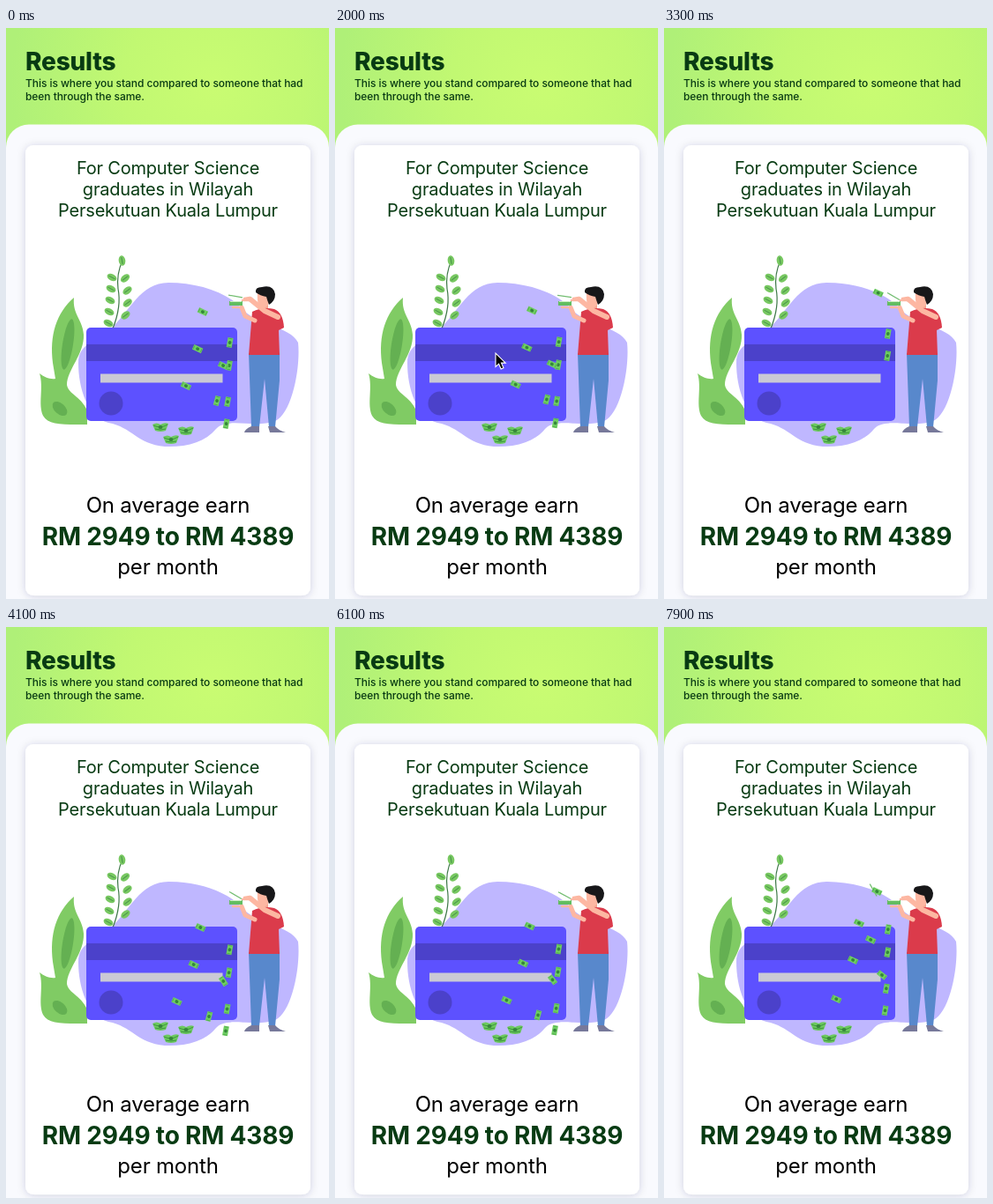
Write an HTML page that moves like this. It is 366 px wide and 648 px high and loops after 8000 ms.

```html
<!DOCTYPE html>
<html lang="en">
<head>
<meta charset="utf-8">
<title>Results</title>
<style>
  html, body { margin: 0; width: 100%; height: 100%; overflow: hidden; }
  svg { display: block; width: 366px; height: 648px; font-family: Inter, sans-serif; letter-spacing: -.2px; }
  .mid { text-anchor: middle; }
  .note { font-size: 12px; font-weight: 500; letter-spacing: -.06px; }
  .skin { stroke: #fdb7a2; stroke-linecap: round; stroke-linejoin: round; fill: none; }
</style>
</head>
<body>
<svg viewBox="0 0 366 648">
  <defs>
    <radialGradient id="sky" gradientUnits="userSpaceOnUse" cx="235" cy="65" r="230">
      <stop offset="0" stop-color="#c9fc72"/>
      <stop offset=".45" stop-color="#c1f872"/>
      <stop offset="1" stop-color="#aff078"/>
    </radialGradient>
    <filter id="shade" x="-10%" y="-10%" width="120%" height="120%">
      <feDropShadow dx="0" dy="1" stdDeviation="5" flood-color="#30304a" flood-opacity=".17"/>
    </filter>
    <g id="bill">
      <rect x="-5.5" y="-3" width="11" height="6" fill="#6fce63"/>
      <ellipse rx="2" ry="1.8" fill="#35863a"/>
      <path d="M-4.5-2v4M4.5-2v4" stroke="#4ea84a" stroke-width=".8"/>
    </g>
    <g id="heap">
      <path d="M-9-3Q-4-6 0-3Q5-6 9-4L6 4Q0 6-6 4Z" fill="#6cc95f"/>
      <path d="M-8-2Q0 2 8-3M-6 2Q0 4 6 2" stroke="#3f963f" fill="none"/>
      <ellipse rx="2.5" ry="2" fill="#35863a"/>
    </g>
  </defs>

  <rect width="366" height="648" fill="url(#sky)"/>
  <rect y="109.500" width="366" height="600" rx="26" fill="#f9fafe"/>
  <rect x="22" y="133" width="323" height="511" rx="9" fill="#fff" filter="url(#shade)"/>

  <g fill="#083b13">
    <text x="22" y="48" font-size="28" font-weight="800">Results</text>
    <text class="note" x="22" y="67">This is where you stand compared to someone that had</text>
    <text class="note" x="22" y="82">been through the same.</text>
    <g class="mid" font-size="20">
      <text x="183.5" y="166">For Computer Science</text>
      <text x="183.5" y="190">graduates in Wilayah</text>
      <text x="183.5" y="214">Persekutuan Kuala Lumpur</text>
    </g>
    <text class="mid" x="183.5" y="587" font-size="28" font-weight="700">RM 2949 to RM 4389</text>
  </g>
  <g class="mid" font-size="24">
    <text x="183.5" y="550">On average earn</text>
    <text x="183.5" y="620">per month</text>
  </g>

  <!-- backdrop and plants -->
  <path d="M118 342C140 322 152 289 184 289C216 289 248 299 265 316C282 338 322 338 331 357C334 385 324 438 305 446C283 455 250 441 238 455C226 470 204 476 180 475C148 472 143 453 116 448C92 442 82 408 82 380C82 358 102 356 118 342Z" fill="#bfb7ff"/>
  <g fill="#80cb64">
    <path d="M77 306C57 323 49 349 53 380L56 398C50 399 43 396 38 392C43 408 36 427 42 440C48 451 65 450 92 450V434C84 417 71 416 69 405C69 388 89 370 88 348C87 331 75 325 77 306Z"/>
    <g fill="#64b052">
      <ellipse cx="70" cy="359" rx="6" ry="29" transform="rotate(9 70 359)"/>
      <ellipse cx="61" cy="432" rx="6" ry="10" transform="rotate(-48 61 432)"/>
    </g>
  </g>
  <path d="M121 341Q131 316 127 296Q125 279 132 264" fill="none" stroke="#3c7746" stroke-width="1.200"/>
  <g id="sprig" fill="#78c861"></g>

  <!-- bank card -->
  <rect x="91" y="340" width="171" height="106" rx="5" fill="#5d51ff"/>
  <path d="M91 359H262V378H91Z" fill="#4b41ca"/>
  <path d="M107 392.500H245.500V402.500H107Z" fill="#cac9d5"/>
  <circle cx="119" cy="426" r="13.500" fill="#4b41ca"/>

  <use href="#heap" x="175" y="453"/>
  <use href="#heap" x="204" y="457"/>
  <use href="#heap" x="187" y="467"/>

  <!-- standing figure -->
  <path d="M275 369H310V400L305 453H298L293 398L287 453H278Z" fill="#5888cc"/>
  <path d="M278 452H287V459H270Q271 455 278 452ZM297 452H305Q309 457 317 459H299Z" fill="#77799a"/>
  <path d="M287 314L297 313V325H286Z" fill="#f6a58f"/>
  <path d="M285 299Q284 315 289 318Q298 319 299 306L296 298Z" fill="#fdb7a2"/>
  <path d="M283 300Q282 294 290 294Q303 291 305 302Q305 310 298 314Q296 309 295 305Q288 304 283 300Z" fill="#171719"/>
  <path d="M279 322Q291 316 304 319Q314 323 315 340L309 343L310 371H275Z" fill="#db3b4b"/>
  <path class="skin" d="M282 332L271 327L267 317" stroke-width="5"/>
  <path class="skin" d="M308 328L293 321L277 308" stroke-width="6"/>
  <path class="skin" d="M278 309H268M276 306L270 307M267 317H257" stroke-width="2.500"/>
  <path d="M253 310H268V315H253Z" fill="#62bd61"/>
  <path d="M254 310.500H267" stroke="#c9efc0"/>

  <path id="flick" d="M-8 0H8" stroke="#72bd70" stroke-width="1.200"/>
  <g id="bills"></g>
  <path id="cursor" d="M0 0V15.500L3.600 12.200L6.100 18L9 16.700L6.500 11.100H11.200Z" stroke="#fff" stroke-width="1.100"/>
</svg>

<script>
const LOOP = 8000, STEP = 100, CYCLE = 2007, START = 1000;
const $ = id => document.getElementById(id);
const clamp = v => Math.max(0, Math.min(1, v));
const place = (el, x, y, a = 0) =>
  el.setAttribute('transform', `translate(${x} ${y}) rotate(${a})`);
const show = (el, on) => el.style.display = on ? '' : 'none';

function add(parent, tag, attrs) {
  const el = document.createElementNS('http://www.w3.org/2000/svg', tag);
  for (const k in attrs) el.setAttribute(k, attrs[k]);
  return parent.appendChild(el);
}

function leaf(x, y, a) {
  const g = add($('sprig'), 'g', {});
  add(g, 'ellipse', { rx: 5.8, ry: 3.8 });
  add(g, 'path', { d: 'M-4 0H4', stroke: '#479449' });
  place(g, x, y, a);
}
leaf(131.5, 264, 80);
for (let i = 0; i < 5; i++) {
  leaf(120 - i, 283 + i * 13, 28);
  if (i < 4) leaf(135 + Math.sin(i) * 3, 284 + i * 14, -38);
}

// A tossed note arcs out of the hand, then falls along one of two curves.
const FALL = .22, TOSS = 60;
function toss(curve) {
  return age => {
    const y = 297 + FALL * age, u = 1 + age / TOSS;
    if (age < -TOSS || y > 446) return;
    if (age < 0) return [262 - 27 * u, 310 - 13 * u, 25];
    return [...curve(y, age), y].length && [curve(y, age)[0], y, curve(y, age)[1]];
  };
}
const left = toss((y, age) =>
  [221 + 14 * Math.exp(-age / TOSS) - 40 * ((y - 297) / 145) ** 3, 25]);
const right = toss(y =>
  [Math.max(230, 247 - .0088 * (y - 393) ** 2), 25 + 80 * clamp((y - 390) / 30)]);

// A dropped note sinks slowly, straight below the hand.
function drop(age) {
  const y = 318 + .108 * age;
  if (age >= 0 && y < 462) return [254 - 5 * ((y - 318) / 140) ** 2, y, 100];
}

const notes = [];
const release = (path, ...times) => times.forEach(t =>
  notes.push({ path, t, el: add($('bills'), 'use', { href: '#bill' }) }));
release(drop, 793, 1024, 1405, 1646);
release(left, 1310, 1511, 1702, 1893, 2257, 2603);
release(right, 1434, 1616, 2352);

const flicks = [1200, 1660, 2000, 2480];
const stops = [[1700, 2600, 182, 369], [4600, 5400, 114, 226]];

function draw(t) {
  let p = t % CYCLE;
  if (p < START) p += CYCLE;

  for (const note of notes) {
    const pose = note.path(p - note.t);
    show(note.el, pose);
    if (pose) place(note.el, ...pose);
  }

  const from = flicks.find(f => p >= f && p < f + 240);
  show($('flick'), from);
  if (from) {
    const q = p - from, k = clamp((q - 100) / 120);
    place($('flick'), 260 - 23 * k, 304.5 - 6 * k, 8 + q * .24);
  }

  const stop = stops.find(([a, b]) => t >= a && t < b);
  show($('cursor'), stop);
  if (stop) place($('cursor'), stop[2], stop[3]);
}

const begin = performance.now();
function tick() {
  const t = (performance.now() - begin) % LOOP;
  draw(Math.floor(t / STEP) * STEP);
  requestAnimationFrame(tick);
}
tick();
</script>
</body>
</html>
```
